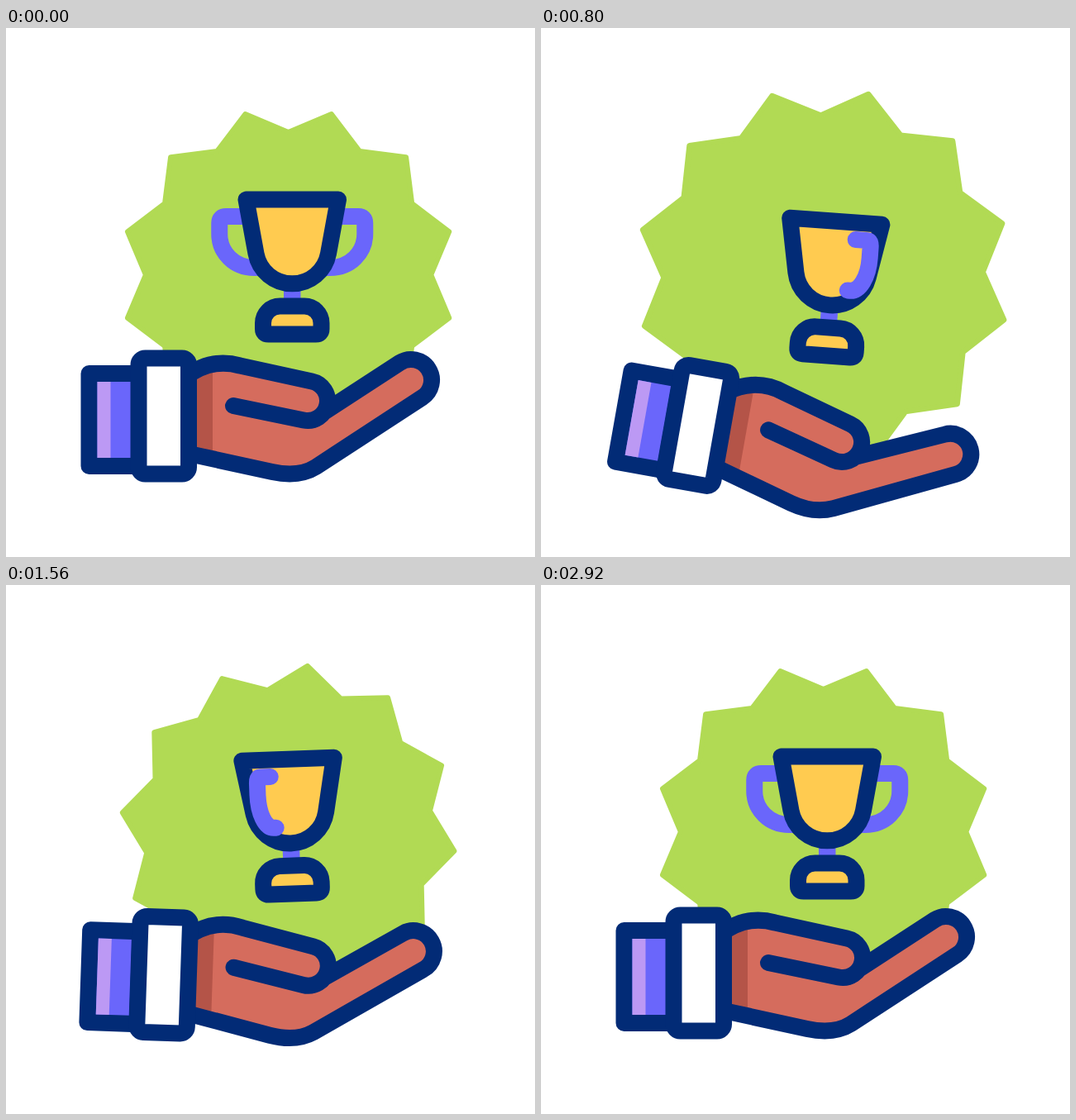
Animation, 640 px wide and 640 px high, one loop 3 s. Source, as an HTML page:

```html
<!DOCTYPE html>
<html lang="en">
<head>
<meta charset="utf-8">
<title>Trophy in hand</title>
<style>
  html, body { margin: 0; width: 100%; height: 100%; overflow: hidden; background: #fff; }
  svg { display: block; width: 100vw; height: 100vh; }
  .line { stroke: #022b76; stroke-width: 20; stroke-linejoin: round; stroke-linecap: round; }
  .handle { stroke: #6a66fb; stroke-width: 20; stroke-linejoin: round; stroke-linecap: round; fill: none; }
</style>
</head>
<body>
<svg viewBox="0 0 640 640">
  <defs><clipPath id="skin"><path id="skinShape"/></clipPath></defs>
  <path id="star" fill="#b1da54" stroke="#b1da54" stroke-width="6" stroke-linejoin="round"/>
  <g id="trophy">
    <path id="backHandles" class="handle"/>
    <path d="M336 310h20.5v26h-20.5z" fill="#6a66fb"/>
    <path class="line" fill="#ffcb50" d="M311 364V357A20.5 20.5 0 0 1 331.5 336.5H361A20.5 20.5 0 0 1 381.5 357V364Q381.5 370.5 375 370.5H317.5Q311 370.5 311 364Z"/>
    <path class="line" fill="#ffcb50" d="M290.5 207.5H402L390 273A44.5 44.5 0 0 1 302.5 273Z"/>
    <path id="frontHandle" class="handle"/>
  </g>
  <path id="flesh" fill="#d56c5d"/>
  <g clip-path="url(#skin)"><path id="shade" fill="#b45448" d="M190 370H250V570H190Z"/></g>
  <path id="outline" class="line" fill="none"/>
  <g id="cuff">
    <path class="line" fill="#6a66fb" d="M100.5 418H161V530H100.5Z"/>
    <path fill="#bc99f4" d="M110.5 428H126.5V520H110.5Z"/>
    <rect class="line" fill="#fff" x="160.5" y="399.5" width="60.5" height="140" rx="8"/>
  </g>
</svg>
<script>
const LOOP = 3000, STEP = 40, AXIS = 346.25;
const el = id => document.getElementById(id);
const set = (id, name, value) => el(id).setAttribute(name, value);

const keys = {
  hand: [[120, 0], [725, 1.06], [1240, -.41], [1840, .68], [2280, 0]],
  lift: [[120, 0], [790, 26], [1250, -20.7], [1850, 24.6], [2505, 0]],
  tilt: [[0, 0], [660, 5], [1320, -2.4], [2280, 0]],
  size: [[50, 1], [700, 1.14], [1240, .887], [1840, 1.098], [2410, 1]],
  spin: [[0, 0], [480, 72], [800, 300], [1240, 607], [1840, 875], [2280, 900]],
  turn: [[0, 0], [480, 6], [800, 31], [1240, 94], [1840, 151], [2280, 171], [2900, 180]]
};

// Cubic through the keys: eases to rest at turning points, never overshoots.
function track(points, t) {
  const last = points.length - 1;
  if (t <= points[0][0]) return points[0][1];
  if (t >= points[last][0]) return points[last][1];
  const slope = i => (points[i + 1][1] - points[i][1]) / (points[i + 1][0] - points[i][0]);
  const tangent = i => {
    if (i === 0 || i === last) return 0;
    const a = slope(i - 1), b = slope(i);
    return a * b <= 0 ? 0 : 2 * a * b / (a + b);
  };
  let i = 0;
  while (t > points[i + 1][0]) i++;
  const [t0, v0] = points[i], [t1, v1] = points[i + 1];
  const span = t1 - t0, u = (t - t0) / span, s = u * u * (3 - 2 * u);
  return v0 + (v1 - v0) * s
    + span * u * (1 - u) * ((1 - u) * tangent(i) - u * tangent(i + 1));
}

function rotate([x, y], deg, [px, py]) {
  const a = deg * Math.PI / 180, c = Math.cos(a), s = Math.sin(a);
  return [px + (x - px) * c - (y - py) * s, py + (x - px) * s + (y - py) * c];
}

function starPath() {
  const points = [];
  for (let i = 0; i < 24; i++) {
    const a = i * Math.PI / 12, r = i % 2 ? 201.5 : 172.7;
    points.push([r * Math.sin(a), -r * Math.cos(a)].map(v => v.toFixed(2)));
  }
  return `M${points.join("L")}Z`;
}

function handlePath(k) {
  const x = d => AXIS + d * k;
  return `M${x(51)} 228H${x(80)}Q${x(88)} 228 ${x(88)} 236V249`
    + `C${x(88)} 272 ${x(70)} 290 ${x(46)} 290H${x(40)}`;
}

function drawTrophy(lift, tilt, spin) {
  const a = spin * Math.PI / 180, c = Math.cos(a);
  const near = Math.sin(a) > 0 ? -c : c;
  const inFront = Math.abs(c) < .75;
  set("trophy", "transform", `translate(0 ${lift}) rotate(${tilt} 346.5 353.5)`);
  set("backHandles", "d", handlePath(-near) + (inFront ? "" : handlePath(near)));
  set("frontHandle", "d", inFront ? handlePath(near) : "");
}

function drawHand(bend) {
  const palm = (x, y) => rotate([x, y], 13.5 * bend, [148, 472]);
  const finger = (x, y) => palm(...rotate([x, y], 4.5 * bend, [370, 510]));
  const thumb = `M${palm(215, 424)}C${palm(236, 407)} ${palm(258, 401.5)} ${palm(283, 408.5)}`
    + `L${palm(370, 427.5)}A24 24 0 0 1 ${palm(360, 474.5)}`;
  const rest = `${palm(385, 464.5)}L${finger(476.4, 405)}`
    + `A25 25 0 0 1 ${finger(503.6, 447)}L${finger(375, 531)}`
    + `C${finger(360, 540.5)} ${palm(341, 541)} ${palm(322, 537)}L${palm(212, 513)}`;
  const body = `${thumb}L${rest}Z`;
  set("flesh", "d", body);
  set("skinShape", "d", body);
  set("outline", "d", `${thumb}L${palm(275, 457)}M${rest}`);
  const wrist = `rotate(${10.3 * bend} 125 468)`;
  set("cuff", "transform", wrist);
  set("shade", "transform", wrist);
}

function draw(t) {
  const at = name => track(keys[name], t);
  set("star", "transform", `translate(341.6 298.6) rotate(${-at("turn")}) scale(${at("size")})`);
  drawTrophy(at("lift"), at("tilt"), at("spin"));
  drawHand(at("hand"));
}

set("star", "d", starPath());
const start = performance.now();
function frame() {
  const t = (performance.now() - start) % LOOP;
  draw(Math.floor(t / STEP) * STEP);
  requestAnimationFrame(frame);
}
frame();
</script>
</body>
</html>
```
